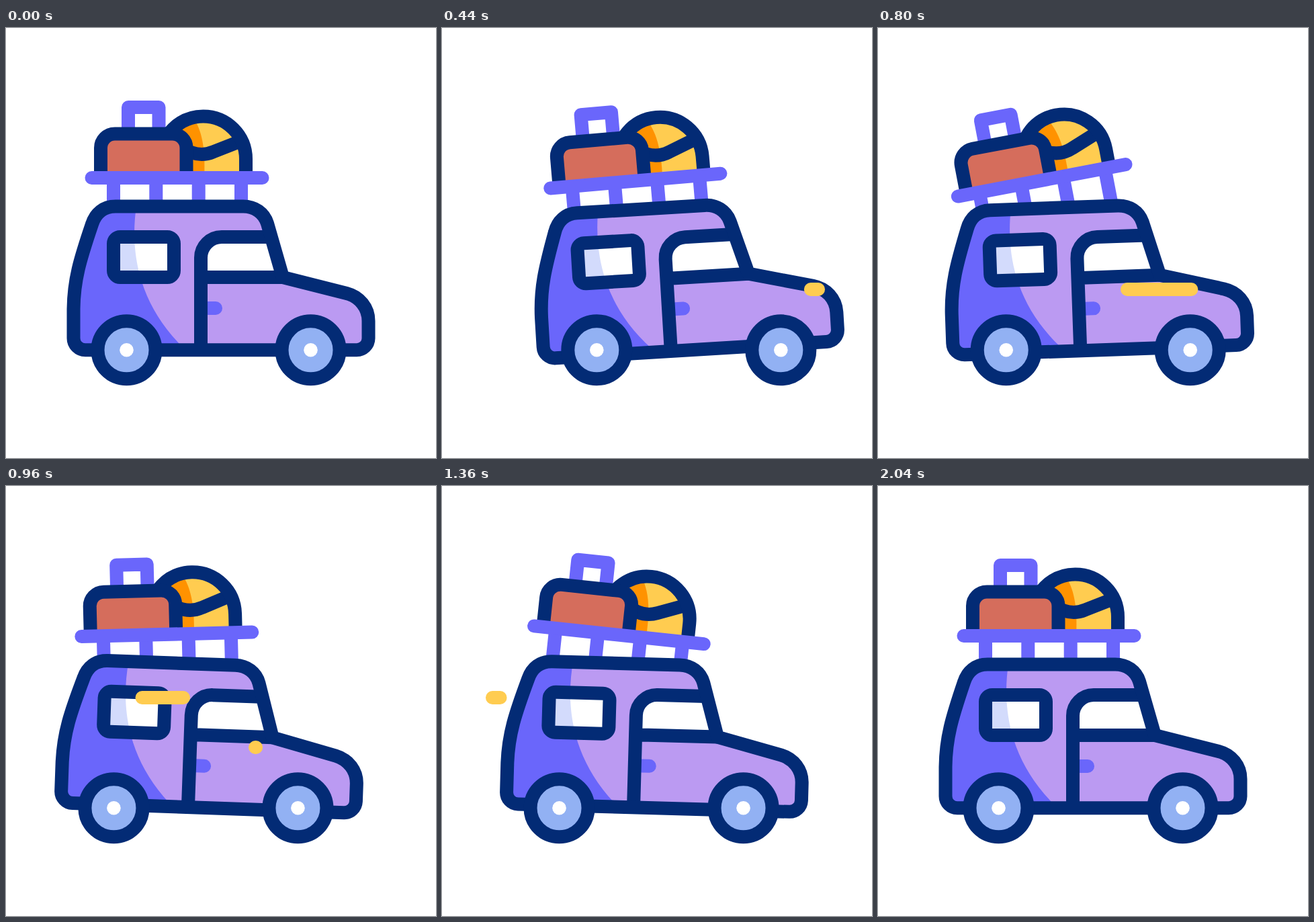
An HTML page for the animation above (2.08 s loop, 640 by 640 pixels).

```html
<!DOCTYPE html>
<html lang="en">
<head>
<meta charset="utf-8">
<title>Travel car</title>
<style>
  html, body { margin: 0; height: 100%; overflow: hidden; background: #fff; }
  svg { display: block; width: 100vw; height: 100vh; }
  .ink { stroke: #032b75; }
  .violet { stroke: #6a66fb; }
  .wind { stroke: #ffcc50; stroke-linecap: round; }
</style>
</head>
<body>
<svg viewBox="0 0 640 640" fill="none" stroke-width="20" stroke-linejoin="round">
  <defs>
    <path id="shell" d="M118 479.2A17.5 17.5 0 0 1 100.5 461.5V418C101 375 110 345 128 292C133 276 145 265.5 163 265.5H353C370 265.5 384 275 389 291L412 371L507 395C526 400 539.5 416 539.5 436V462A17.5 17.5 0 0 1 522 479.2Z"/>
    <path id="shade" d="M60 265H194C184 335 198 410 262 474V500H60Z"/>
    <path id="dome" d="M230 223V195a63.5 63.5 0 0 1 127 0V223"/>
    <clipPath id="inShell"><use href="#shell"/></clipPath>
    <clipPath id="inWindow"><path d="M160 311h90v60h-90z"/></clipPath>
    <clipPath id="inDome"><use href="#dome"/></clipPath>
    <g id="wheel">
      <circle cy="479.3" r="43" fill="#92b1f3" class="ink"/>
      <circle cy="479.3" r="10.3" fill="#fff"/>
    </g>
  </defs>

  <g id="car">
    <g id="body">
      <g id="rack">
        <path class="violet" d="M182 160V118H227.5V160"/>
        <g clip-path="url(#inDome)">
          <path fill="#ffcc50" d="M225 125h140v100H225z"/>
          <path fill="#ff9200" d="M276 130C292 150 297 180 295 223H225V130Z"/>
          <path class="ink" d="M262 178C280 190 295 190 308 184.5L354 166.5"/>
        </g>
        <use href="#dome" class="ink"/>
        <path fill="#d56d5c" class="ink" d="M141 220V178.5a21 21 0 0 1 21-21H247.5a21 21 0 0 1 21 21V220"/>
        <path class="violet" d="M160 223V285M223.3 223V285M286.7 223V285M350 223V285"/>
        <path class="violet" stroke-linecap="round" d="M127.5 223H381.5"/>
      </g>

      <use href="#shell" fill="#bb9af2"/>
      <use href="#shade" fill="#6a66fb" clip-path="url(#inShell)"/>
      <path fill="#fff" d="M160 311h90v60h-90z"/>
      <use href="#shade" fill="#d3dbfc" clip-path="url(#inWindow)"/>
      <rect class="ink" x="160" y="311" width="90" height="60" rx="10"/>
      <path class="violet" stroke-linecap="round" d="M300 417H312"/>
      <path fill="#fff" d="M290 371V342a31 31 0 0 1 31-31H395L412 371Z"/>
      <path class="ink" d="M290 479V342a31 31 0 0 1 31-31H393M290 371H412"/>
      <use href="#shell" class="ink"/>
    </g>
    <use href="#wheel" x="179.5"/>
    <use href="#wheel" x="453.5"/>
  </g>

  <path id="wind1" class="wind"/>
  <path id="wind2" class="wind"/>
</svg>

<script>
const LOOP = 2080, STEP = 40;

// Keys are [time, value]
const shift = [[140, 0], [472, 52], [575, 52], [990, -20], [1544, 0]];
const tilt = [[130, 0], [250, 2.5], [540, -5.6], [1220, 5.6], [1498, -2.3], [2040, 0]];
const sway = [[140, 0], [270, 1.3], [760, -9], [1270, 7.6], [1526, -3.9], [2040, 0]];

const el = id => document.getElementById(id);
const ease = p => (1 - Math.cos(Math.PI * Math.min(1, Math.max(0, p)))) / 2;

function at(keys, t) {
  let value = keys[0][1];
  for (let i = 1; i < keys.length; i++) {
    const [t0, v0] = keys[i - 1], [t1, v1] = keys[i];
    value += (v1 - v0) * ease((t - t0) / (t1 - t0));
  }
  return value;
}

// A streak whose tail follows its head along the same stretch
function streak(id, t, start, x, y) {
  const length = 189, time = 352, lag = 240;
  const head = x - length * ease((t - start) / time);
  const tail = x - length * ease((t - start - lag) / time);
  el(id).setAttribute("d", tail - head > 0.1 ? `M${tail} ${y}H${head}` : "");
}

function draw(now) {
  const t = Math.floor(now % LOOP / STEP) * STEP;
  el("car").setAttribute("transform", `translate(${at(shift, t)})`);
  el("body").setAttribute("transform", `rotate(${at(tilt, t)} 320 479)`);
  el("rack").setAttribute("transform", `rotate(${at(sway, t)} 254 309)`);
  streak("wind1", t, 385, 560, 389);
  streak("wind2", t, 824, 264, 315);
}

const begin = performance.now();
function frame() {
  draw(performance.now() - begin);
  requestAnimationFrame(frame);
}
frame();
</script>
</body>
</html>
```
